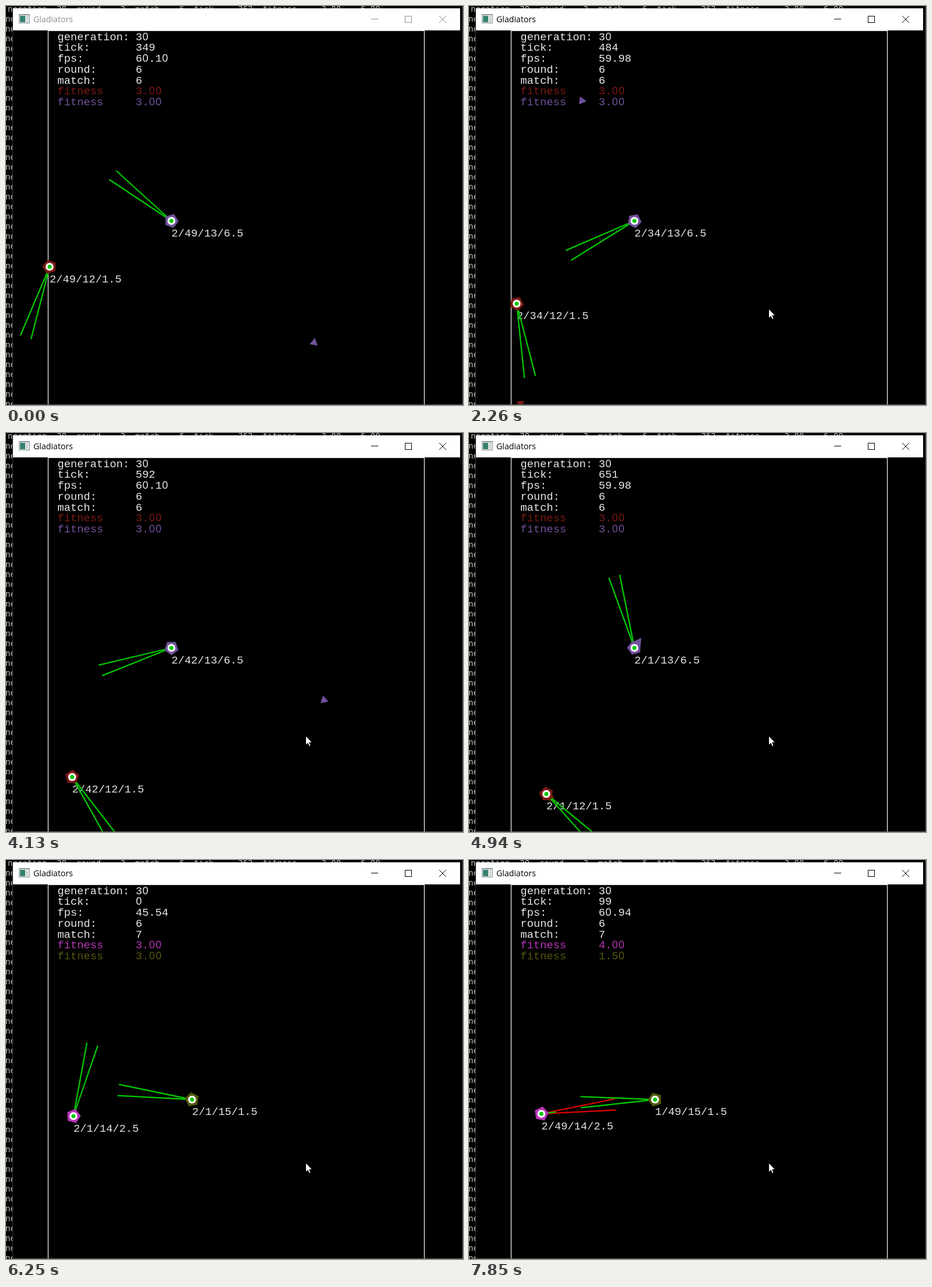
Recreate the animation shown at these times as an HTML page with a canvas. Size 786 px wide and 687 px high, loop 8 s.

```html
<!DOCTYPE html>
<html lang="en">
<head>
<meta charset="utf-8">
<title>Gladiators</title>
<style>
  html, body { margin: 0; width: 100%; height: 100%; overflow: hidden; background: #000; }
  canvas { display: block; }
</style>
</head>
<body>
<canvas id="stage" width="786" height="687"></canvas>
<script>
const ctx = document.getElementById('stage').getContext('2d');
const LOOP = 8000, HOLD = 133, FOCUS = 1620, SECOND = 6250, RELOAD = 50, RAD = Math.PI / 180;
const GREEN = '#00c800', RED = '#7a1a14', PURPLE = '#70519a', MAGENTA = '#b634b8', OLIVE = '#55570f';

// Beats of the clock in ms, and the frame rate shown from each on
const beats = [0, 1120, 2260, 3460, 4940, SECOND, 7850, LOOP];
const rates = [60.10, 57.03, 59.98, 60.10, 59.98, 45.54, 60.94];

// tick, x, y, heading; the purple one spins on the spot, about -53 degrees a tick
const redPath = [[349, 75, 449], [413, 74, 453.5], [484, 82, 512.5], [559, 103, 576], [651, 133, 621.5]];
const purpleSpin = [[349, 218], [413, -3262.5], [484, -7047.6], [559, -11036.8], [651, -15945.7]];
const magentaPath = [[0, 116, 441, -75.3], [99, 124.5, 437, -367.2]];
const olivePath = [[0, 320, 412.5, 187.4], [99, 320, 412.5, 178]];

// Headings of the purple shots, one per reload
const FIRST_SHOT = 300;
const aims = [40.5, 100, -80, 246.4, 54.4, 18.9, 90, -56, 163];

// Linear through the keys, running on past the last
function along(keys, t) {
  let i = 0;
  while (i < keys.length - 2 && t >= keys[i + 1][0]) i++;
  const a = keys[i], b = keys[i + 1], u = (t - a[0]) / (b[0] - a[0]);
  return a.map((v, j) => v + (b[j] - v) * u).slice(1);
}

const redAt = tick => [...along(redPath, tick), 108.7 - 0.2145 * (tick - 349)];
const purpleAt = tick => [284.5, 370, ...along(purpleSpin, tick)];

function box(x, y, w, h, color) {
  ctx.fillStyle = color;
  ctx.fillRect(x, y, w, h);
}

function line(x1, y1, x2, y2, color, width = 1) {
  ctx.beginPath();
  ctx.moveTo(x1, y1);
  ctx.lineTo(x2, y2);
  ctx.strokeStyle = color;
  ctx.lineWidth = width;
  ctx.stroke();
}

function polygon(x, y, r, sides, angle, color) {
  ctx.beginPath();
  for (let i = 0; i < sides; i++) {
    const a = angle * RAD + i * 2 * Math.PI / sides;
    ctx.lineTo(x + r * Math.cos(a), y + r * Math.sin(a));
  }
  ctx.fillStyle = color;
  ctx.fill();
}

function disc(x, y, r, color) {
  ctx.beginPath();
  ctx.arc(x, y, r, 0, 7);
  ctx.fillStyle = color;
  ctx.fill();
}

// Fixed-pitch text with an open zero
function mono(text, x, y, color) {
  ctx.fillStyle = color;
  [...text].forEach((c, i) => {
    const zero = c === '0';
    ctx.font = zero ? '18px "Liberation Sans", sans-serif' : '18.75px "Liberation Mono", monospace';
    ctx.fillText(c, x + i * 11.25 + (zero ? 0.6 : 0), y);
  });
}

function ray(x, y, angle, length, color) {
  const a = angle * RAD;
  line(x, y, x + length * Math.cos(a), y + length * Math.sin(a), color, 2.3);
}

function agent([x, y, angle], color, label, seen) {
  mono(label, x, y + 26.5, '#e4e4e4');
  for (const d of [-4.3, 4.3]) ray(x, y, angle + d, 128.5, seen ? '#d00000' : GREEN);
  if (seen) ray(x, y, angle, 25, GREEN);
  polygon(x, y, 12.6, 5, angle, color);
  disc(x, y, 6.8, '#fff');
  disc(x, y, 3.5, GREEN);
}

function shot([x, y, angle], age, speed, color) {
  if (age < 1) return;
  const d = 6.5 + speed * age, a = angle * RAD;
  const px = x + d * Math.cos(a), py = y + d * Math.sin(a);
  if (px > 72 && px < 719) polygon(px, py, 8, 3, angle, color);
}

function hud(tick, fps, match, first, second) {
  const rows = [['generation:', 30], ['tick:', tick], ['fps:', fps.toFixed(2)], ['round:', 6], ['match:', match],
    ['fitness', ...first], ['fitness', ...second]];
  rows.forEach(([name, value, color = '#e8e8e8'], i) => {
    const y = 58.5 + i * 18.75;
    mono(name, 88.5, y, color);
    mono(String(value), 223, y, color);
  });
}

function terminal() {
  box(0, 0, 786, 687, '#000');
  ctx.font = '14px "DejaVu Sans Mono", monospace';
  ctx.fillStyle = '#c0c0c0';
  ctx.fillText('neration  30  round    3  match    6  tick     363  fitness     3.00    6.00', 3, 10);
  for (let y = 27; y < 700; y += 17) ctx.fillText('ne', -1, y);
  box(12, 4, 774, 683, '#000');
  line(785.5, 0, 785.5, 687, '#555');
  line(12, 686.5, 786, 686.5, '#666');
  line(11.5, 4, 11.5, 687, '#333');
}

function titleBar(active) {
  const ink = active ? '#000' : '#8e8e8e';
  box(12, 4, 769, 38, '#fff');
  box(22, 14, 19, 16, '#8d979b');
  box(23, 16, 17, 13, '#eef1f1');
  box(24, 17, 9, 11, '#37806f');
  for (let y = 18; y < 28; y += 3) box(34, y, 5, 1, '#a5adb0');
  ctx.font = '14.2px "Open Sans", sans-serif';
  ctx.fillStyle = ink;
  ctx.fillText('Gladiators', 47, 28);
  line(628, 22.5, 640, 22.5, ink);
  ctx.strokeRect(686.5, 17.5, 11, 11);
  line(745, 17, 757, 29, ink);
  line(757, 17, 745, 29, ink);
}

function cursor(x, y) {
  const arrow = new Path2D('M0 0V16L3.6 12.6 6 18 8.6 17 6.2 11.6 11 11.4Z');
  ctx.save();
  ctx.translate(x, y);
  ctx.fillStyle = '#fff';
  ctx.fill(arrow);
  ctx.strokeStyle = '#000';
  ctx.lineWidth = 1;
  ctx.stroke(arrow);
  ctx.restore();
}

function firstMatch(t, fps) {
  const tick = Math.max(349, Math.round(413 + (t - 1120) * 0.0623));
  const load = tick % RELOAD;
  hud(tick, fps, 6, ['3.00', RED], ['3.00', PURPLE]);
  aims.forEach((aim, i) => {
    const born = FIRST_SHOT + i * RELOAD;
    shot([284.5, 370, aim], tick - born, 6.45, PURPLE);
    shot(redAt(born), tick - born, 5.7, RED);
  });
  agent(redAt(tick), RED, `2/${load}/12/1.5`);
  agent(purpleAt(tick), PURPLE, `2/${load}/13/6.5`);
}

function secondMatch(t, fps) {
  const tick = Math.round((t - SECOND) * 0.0619);
  const hit = tick >= 79, load = tick % RELOAD || 1;
  hud(tick, fps, 7, [hit ? '4.00' : '3.00', MAGENTA], [hit ? '1.50' : '3.00', OLIVE]);
  if (!hit) shot([120, 439, -7.2], tick - RELOAD, 6.45, MAGENTA);
  agent(along(magentaPath, tick), MAGENTA, `2/${load}/14/2.5`, tick >= 88);
  agent(along(olivePath, tick), OLIVE, `${hit ? 1 : 2}/${load}/15/1.5`);
}

function draw(t, fps) {
  const active = t >= FOCUS;
  terminal();
  ctx.save();
  ctx.beginPath();
  ctx.rect(12, 42, 769, 644);
  ctx.clip();
  ctx.strokeStyle = '#eee';
  ctx.lineWidth = 1.3;
  ctx.strokeRect(72.5, 42.5, 647, 660);
  (t < SECOND ? firstMatch : secondMatch)(t, fps);
  ctx.restore();
  titleBar(active);
  if (active) cursor(515.5, 521.5);
}

// Each span between beats is shown in equal holds
function loop() {
  const t = performance.now() % LOOP;
  const i = beats.findIndex(b => b > t) - 1;
  const span = beats[i + 1] - beats[i];
  const hold = span / Math.round(span / HOLD);
  draw(beats[i] + Math.floor((t - beats[i]) / hold) * hold, rates[i]);
  requestAnimationFrame(loop);
}
loop();
</script>
</body>
</html>
```
